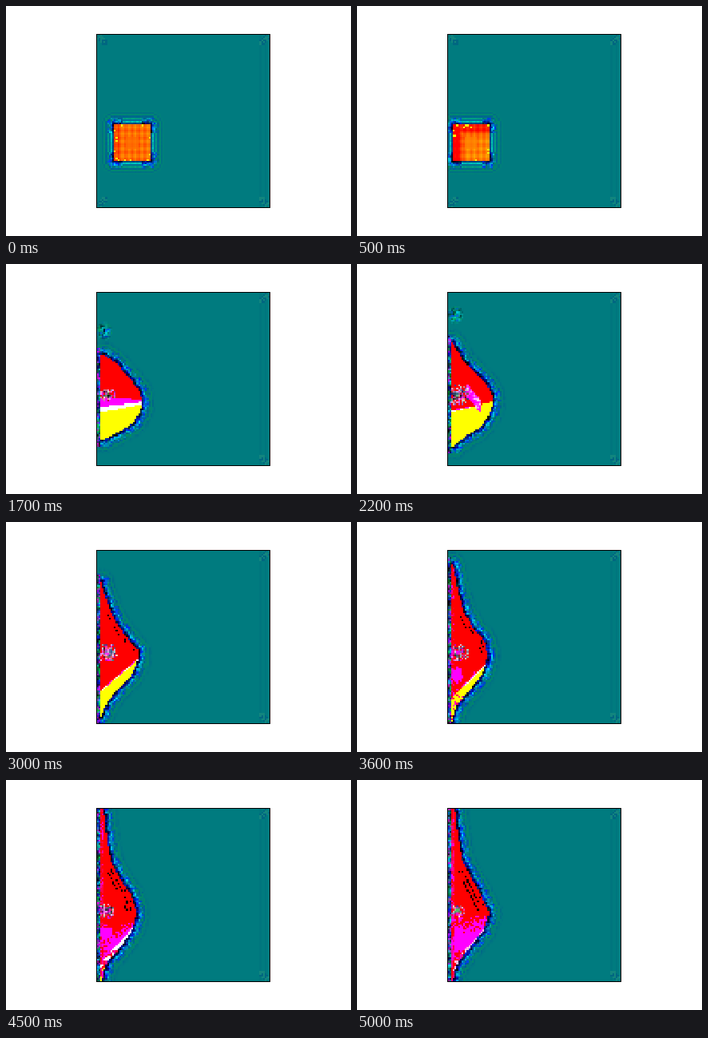
Write an HTML page with a canvas that moves like this. It is 432 by 288 pixels and loops after 5100 ms.

```html
<!DOCTYPE html>
<html>
<head>
<meta charset="utf-8">
<style>
html, body { margin: 0; width: 100%; height: 100%; overflow: hidden; background: #fff; }
canvas { display: block; }
</style>
</head>
<body>
<canvas id="stage" width="432" height="288"></canvas>
<script>
const N = 100, X0 = 113.5, Y0 = 35.5, SIZE = 217, CELL = SIZE / N;
const STEP = 100, FRAMES = 51, REACH = 9;
const ctx = document.getElementById('stage').getContext('2d');
const grid = document.createElement('canvas');
grid.width = grid.height = N;
const gctx = grid.getContext('2d');
const img = gctx.createImageData(N, N);

const RED = [255, 0, 0], MAGENTA = [255, 0, 255], WHITE = [255, 255, 255], YELLOW = [255, 255, 0];
const BLACK = [0, 0, 0], NAVY = [0, 0, 130], BLUE = [0, 40, 255], CYAN = [0, 225, 245];
const GREEN = [0, 190, 60], TEAL = [0, 123, 127], DEEP = [0, 92, 140], SEA = [0, 142, 95];

// Right edge of the body at eleven even heights between top and bottom
const EDGE = [
  { n: 6, y: [148, 194], x: [163, 163, 163, 163, 163, 163, 163, 163, 163, 163, 163] },
  { n: 12, y: [130, 211], x: [124, 150, 160, 166, 169, 170, 170, 167, 162, 150, 124] },
  { n: 22, y: [96, 230], x: [118, 126, 134, 147, 162, 169, 170, 165, 156, 135, 118] },
  { n: 30, y: [75, 246], x: [119, 124, 130, 138, 150, 166, 164, 156, 137, 125, 118] },
  { n: 41, y: [36, 252], x: [122, 124, 126, 130, 140, 158, 162, 158, 145, 125, 120] },
  { n: 50, y: [36, 252], x: [123, 125, 128, 132, 143, 155, 166, 159, 142, 125, 120] }
];
// Band limits as height at the wall and slope: magenta, white, yellow
const BANDS = [
  { n: 6, v: [215, 0, 225, 0, 235, 0] },
  { n: 12, v: [151, .28, 174, -.05, 186, -.12] },
  { n: 22, v: [183, -.18, 184, -.19, 186, -.27] },
  { n: 30, v: [211, -.85, 212, -.85, 213, -.85] },
  { n: 41, v: [227, -1.1, 228, -1.1, 229, -1.1] },
  { n: 50, v: [180, -.02, 232, -1.1, 256, -1.1] }
];
const CORE = [{ n: 6, v: [0] }, { n: 12, v: [6] }, { n: 22, v: [13] }, { n: 41, v: [11] }, { n: 50, v: [8] }];

const HALO = [
  [BLACK, NAVY, [0, 60, 60], NAVY, BLACK, BLUE],
  [BLUE, NAVY, CYAN, [0, 70, 110], [0, 80, 200]],
  [CYAN, BLUE, [0, 150, 200], DEEP, [0, 170, 150]],
  [BLUE, [0, 150, 190], DEEP, SEA, TEAL],
  [DEEP, SEA, TEAL, [0, 90, 165]]
];
const RIPPLE = [[0, 60, 130], [0, 205, 195], [0, 110, 160], [0, 160, 130], [0, 100, 145],
  [0, 138, 112], [0, 112, 132], [0, 128, 122], TEAL];
const WALL = [BLACK, BLUE, GREEN, CYAN, NAVY, [0, 110, 60], MAGENTA];
const SPARKS = [MAGENTA, [70, 200, 90], BLACK, RED, [255, 150, 170], [60, 90, 140], MAGENTA, WHITE];
const SPECKS = [BLACK, CYAN, GREEN, BLUE, SEA, [0, 170, 160]];

const mix = (a, b, k) => a.map((p, i) => p + (b[i] - p) * k);
const clamp = (v, lo, hi) => Math.max(lo, Math.min(hi, v));

function keyed(keys, n, field) {
  let i = 0;
  while (i < keys.length - 2 && n > keys[i + 1].n) i++;
  const a = keys[i], b = keys[i + 1];
  return mix(a[field], b[field], clamp((n - a.n) / (b.n - a.n), 0, 1));
}

function rnd(i, j, k) {
  let h = Math.imul(i + 17, 374761393) ^ Math.imul(j + 31, 668265263) ^ Math.imul(k + 7, 1274126177);
  h = Math.imul(h ^ (h >>> 13), 1103515245);
  return ((h ^ (h >>> 16)) >>> 0) / 4294967296;
}

// Random colour that runs softly into the neighbouring cells
function mottle(list, i, j, n) {
  const at = (a, b) => list[Math.floor(rnd(a, b, n) * list.length)];
  return mix(at(i, j), mix(at(i + 1, j), at(i, j + 1), .5), .45);
}

function background(i, j, n) {
  const di = Math.min(i, N - 1 - i), dj = Math.min(j, N - 1 - j);
  if (di < 6 && dj < 6 && di + dj > 1 && Math.abs(di - dj) < 3 && (i > 50 || n < 12))
    return mix(TEAL, rnd(i, j, 1) < .5 ? [0, 90, 130] : [30, 140, 125], .6);
  if (i === 94 || i === 97) return [0, 118, 126];
  return TEAL;
}

function halo(d, i, j, n) {
  if (d < 5.5) return mottle(HALO[clamp(Math.round(d) - 1, 0, 4)], i, j, n);
  return mix(TEAL, d < 7 ? SEA : DEEP, .6 * rnd(i, j >> 1, n) * clamp((REACH - d) / 2, 0, 1));
}

function squareColor(x, y, s, n) {
  const a = (x - s.left) / CELL, b = (y - s.top) / CELL;
  const rim = Math.min(a, b, 20.5 - a, 20.5 - b);
  if (rim < 1.2 && rnd(a | 0, b | 0, n) < .1) return YELLOW;
  const wave = 16 * Math.sin(a * 1.7) + 13 * Math.sin(b * 1.5);
  const mid = clamp((Math.min(a, b) - 3) / 4, 0, 1);
  const g = 108 + wave * (rim < 7 ? 1.4 : .4) - n * 17 * (1 - mid) - (a < 3 ? 45 : 0) + n * 4 * mid;
  return [255, clamp(g, 0, 220), 0];
}

function bodyColor(x, y, i, j, s, n) {
  const r = rnd(i, j, n), k = x - 118, v = s.bands, late = clamp((n - 30) / 20, 0, 1);
  const q = Math.hypot((x - 127) / 1.1, y - 164) / (s.core + .01);
  if (q < 1 && r > q * .8 - .2) return mottle(SPARKS, i, j, n);
  if (n > 17 && n < 27 && Math.abs(y - 168 - (x - 146) * 1.2) < 8 && Math.abs(x - 146) < 8)
    return mottle([MAGENTA, MAGENTA, MAGENTA, WHITE], i, j, n);
  if (n > 33 && n < 47 && Math.hypot((x - 125) / 8, (y - 192) / 9) < .7 + r * .5) return MAGENTA;
  const gap = s.right(y) - x;
  if (n > 25 && y > 112 && y < 164 && gap > 3 && gap < 8 + 7 * late
      && (i * 2 - j + 400) % 5 < 2 && r < .35 + .2 * late) return BLACK;
  if (late && (k < 5 || y > 214) && r < late * .8) return mottle([RED, MAGENTA, RED, [255, 0, 120]], i, j >> 1, n);
  if (y > v[4] + v[5] * k) return YELLOW;
  if (y > v[2] + v[3] * k) return n > 46 ? [255, 190, 225] : WHITE;
  if (y + late * (r - .5) * 24 > v[0] + v[1] * k) return MAGENTA;
  return RED;
}

function shapeAt(n) {
  const [top, bottom] = keyed(EDGE, n, 'y'), xs = keyed(EDGE, n, 'x'), last = xs.length - 1;
  const moving = n <= 6;
  const right = y => {
    if (moving) return 181 - 3 * n;
    const u = clamp((y - top) / (bottom - top), 0, 1) * last, k = Math.min(last - 1, Math.floor(u));
    return xs[k] + (xs[k + 1] - xs[k]) * (u - k);
  };
  return {
    top: moving ? 149 : top, bottom: moving ? 194 : bottom, left: moving ? 136 - 3 * n : 117.5,
    right, moving, bands: keyed(BANDS, n, 'v'), core: keyed(CORE, n, 'v')[0]
  };
}

function draw(n) {
  const s = shapeAt(n), mask = new Uint8Array(N * N);
  const px = i => X0 + (i + .5) * CELL, py = j => Y0 + (j + .5) * CELL;
  for (let j = 0; j < N; j++) {
    const y = py(j);
    if (y < s.top || y > s.bottom) continue;
    for (let i = 0; i < 40; i++) if (px(i) >= s.left && px(i) <= s.right(y)) mask[j * N + i] = 1;
  }

  const distance = (i, j) => {
    let best = REACH;
    for (let b = Math.max(0, j - REACH); b <= Math.min(N - 1, j + REACH); b++)
      for (let a = Math.max(0, i - REACH); a <= i + REACH; a++)
        if (mask[b * N + a]) best = Math.min(best, Math.hypot(a - i, b - j));
    return best;
  };

  const patchY = 64 - (n - 22) * 4;
  for (let j = 0; j < N; j++) for (let i = 0; i < N; i++) {
    const x = px(i), y = py(j);
    let c = background(i, j, n);
    if (mask[j * N + i]) {
      c = s.moving ? squareColor(x, y, s, n) : bodyColor(x, y, i, j, s, n);
    } else if (i < 45) {
      const d = distance(i, j);
      if (d < REACH) {
        const ex = Math.min(Math.abs(x - s.left), Math.abs(x - s.right(y)));
        const ey = Math.min(Math.abs(y - s.top), Math.abs(y - s.bottom));
        if (s.moving && (ex > 10 || ey > 10)) c = mix(RIPPLE[Math.round(d) - 1], TEAL, rnd(i, j, n) * .4);
        else if (!s.moving && i < 2 && d < 5) c = mottle(WALL, i, j, n);
        else c = halo(d, i, j, n);
      }
      if (n > 15 && n < 29) {
        const p = Math.hypot((x - 123) / 11, (y - patchY) / 12);
        if (p < 1) c = mix(mottle(SPECKS, i, j, n), c, p * p);
      }
    }
    img.data.set([...c, 255], (j * N + i) * 4);
  }

  gctx.putImageData(img, 0, 0);
  ctx.fillStyle = '#fff';
  ctx.fillRect(0, 0, 432, 288);
  ctx.imageSmoothingEnabled = false;
  ctx.drawImage(grid, X0, Y0, SIZE, SIZE);
  ctx.strokeStyle = '#000';
  ctx.lineWidth = 1;
  ctx.strokeRect(X0, Y0, SIZE, SIZE);
}

let shown = -1;
function tick() {
  const n = Math.floor(performance.now() / STEP) % FRAMES;
  if (n !== shown) draw(shown = n);
  requestAnimationFrame(tick);
}
tick();
</script>
</body>
</html>
```
